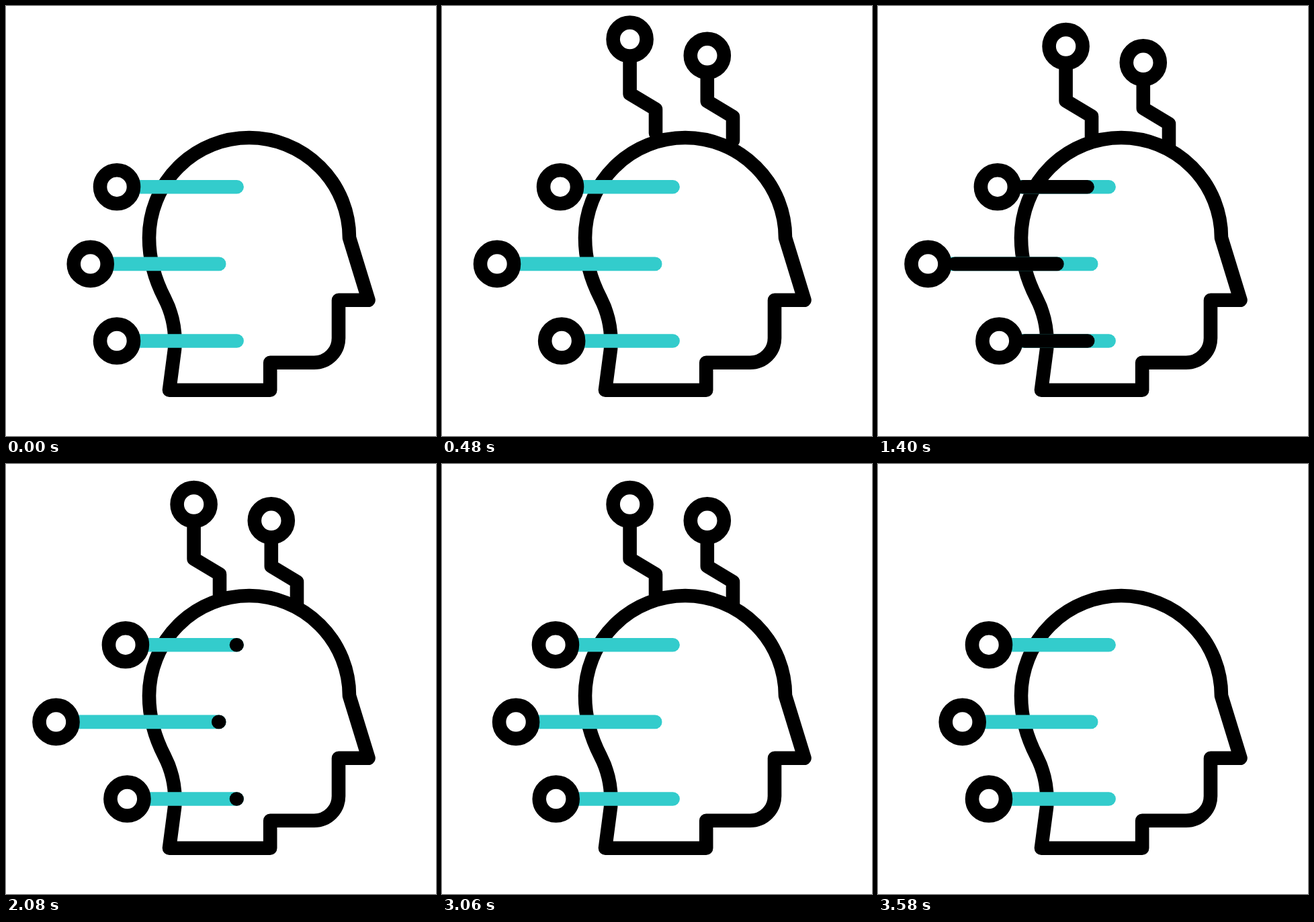
Write an HTML page that moves like this. It is 640 by 640 pixels and loops after 3600 ms.

```html
<!DOCTYPE html>
<html lang="en">
<head>
<meta charset="utf-8">
<title>Connected head</title>
<style>
  html, body { margin: 0; width: 100%; height: 100%; overflow: hidden; background: #fff; }
  svg { display: block; width: 100vw; height: 100vh; }
  path, circle { fill: none; stroke: #000; stroke-width: 20.6; stroke-linecap: round; stroke-linejoin: round; }
  circle, .head { fill: #fff; }
  .teal { stroke: #3cc; }
</style>
</head>
<body>
<svg viewBox="0 0 640 640">
  <g id="antennas"></g>
  <path class="head" d="M511 345L539.5 437.8H495V494A36.5 36.5 0 0 1 458.5 530.7H393.2V571.7H243L251 511Q254 470 236 435C222 408 213 378 213 345A149 149 0 0 1 511 345Z"/>
  <g id="links"></g>
</svg>
<script>
const LOOP = 3600;
const HIDDEN = 242, OVER = -12;

const add = (parent, tag, attrs) => {
  const el = document.createElementNS('http://www.w3.org/2000/svg', tag);
  for (const k in attrs) el.setAttribute(k, attrs[k]);
  return parent.appendChild(el);
};
const byId = id => document.getElementById(id);
const clamp = u => Math.min(1, Math.max(0, u));
const mix = (a, b, u) => a + (b - a) * u;
const smooth = u => u * u * (3 - 2 * u);
const ramp = (t, from, to) => smooth(clamp((t - from) / (to - from)));

// Cubic Bezier timing with flat ends, solved by bisection
const flatBezier = (x1, x2, x) => {
  let lo = 0, hi = 1;
  for (let i = 0; i < 24; i++) {
    const s = (lo + hi) / 2, r = 1 - s;
    if (3 * r * r * s * x1 + 3 * r * s * s * x2 + s * s * s < x) lo = s;
    else hi = s;
  }
  return smooth(lo);
};

// Show the part of a path between two fractions of its length
const trim = (path, a, b) => {
  path.style.display = b > a ? '' : 'none';
  path.setAttribute('stroke-dasharray', `${Math.max(b - a, 0.0001)} 3`);
  path.setAttribute('stroke-dashoffset', -a);
};

const antennas = byId('antennas');
const pulses = [
  { x: 279.6, y: 60, bend: 141.2, foot: 318, knee: 164.2, base: 200 },
  { x: 394.8, y: 84.3, bend: 152.3, foot: 433, knee: 175.3, base: 211 }
].map(({ x, y, bend, foot, knee, base }) => {
  const stem = (bottom, top) => `M${foot} ${bottom}V${knee}L${x} ${bend}V${top}`;
  add(antennas, 'path', { d: stem(base, y) });
  const pulse = add(antennas, 'path', { d: stem(base, y + 44), class: 'teal', pathLength: 1 });
  add(antennas, 'circle', { cx: x, cy: y, r: 25 });
  return pulse;
});

const links = [
  { y: 269.2, end: 343.6, rest: 165, out: 177.9 },
  { y: 383.9, end: 317.2, rest: 125.7, out: 74.5 },
  { y: 498.5, end: 343.6, rest: 165, out: 180.4 }
].map(link => {
  const g = byId('links');
  return {
    ...link,
    line: add(g, 'path', { class: 'teal' }),
    pulse: add(g, 'path', { pathLength: 1 }),
    ring: add(g, 'circle', { cy: link.y, r: 25 })
  };
});

const antennaShift = t => {
  if (t < 460) return mix(HIDDEN, OVER, ramp(t, 0, 460));
  if (t < 3120) return mix(OVER, 0, ramp(t, 460, 555));
  if (t < 3220) return mix(0, OVER, ramp(t, 3120, 3220));
  return mix(OVER, HIDDEN, ramp(t, 3220, 3590));
};

const linkSpread = t => t < 2000
  ? flatBezier(0.55, 0.7, clamp(t / 600))
  : 1 - ramp(t, 2579, 3341);

const linkPulse = t => t < 1900
  ? [ramp(t, 1250, 1720), ramp(t, 1140, 1430)]
  : [ramp(t, 2180, 2600), ramp(t, 2070, 2350)];

function draw(t) {
  antennas.setAttribute('transform', `translate(0 ${antennaShift(t)})`);
  for (const p of pulses) trim(p, ramp(t, 730, 1160), ramp(t, 580, 860));

  const spread = linkSpread(t);
  const [tail, tip] = linkPulse(t);
  for (const { y, end, rest, out, line, pulse, ring } of links) {
    const x = mix(rest, out, spread);
    line.setAttribute('d', `M${end} ${y}H${x}`);
    pulse.setAttribute('d', `M${end} ${y}H${x + 34}`);
    trim(pulse, tail, tip);
    ring.setAttribute('cx', x);
  }
}

const start = performance.now();
function tick() {
  draw((performance.now() - start) % LOOP);
  requestAnimationFrame(tick);
}
tick();
</script>
</body>
</html>
```
